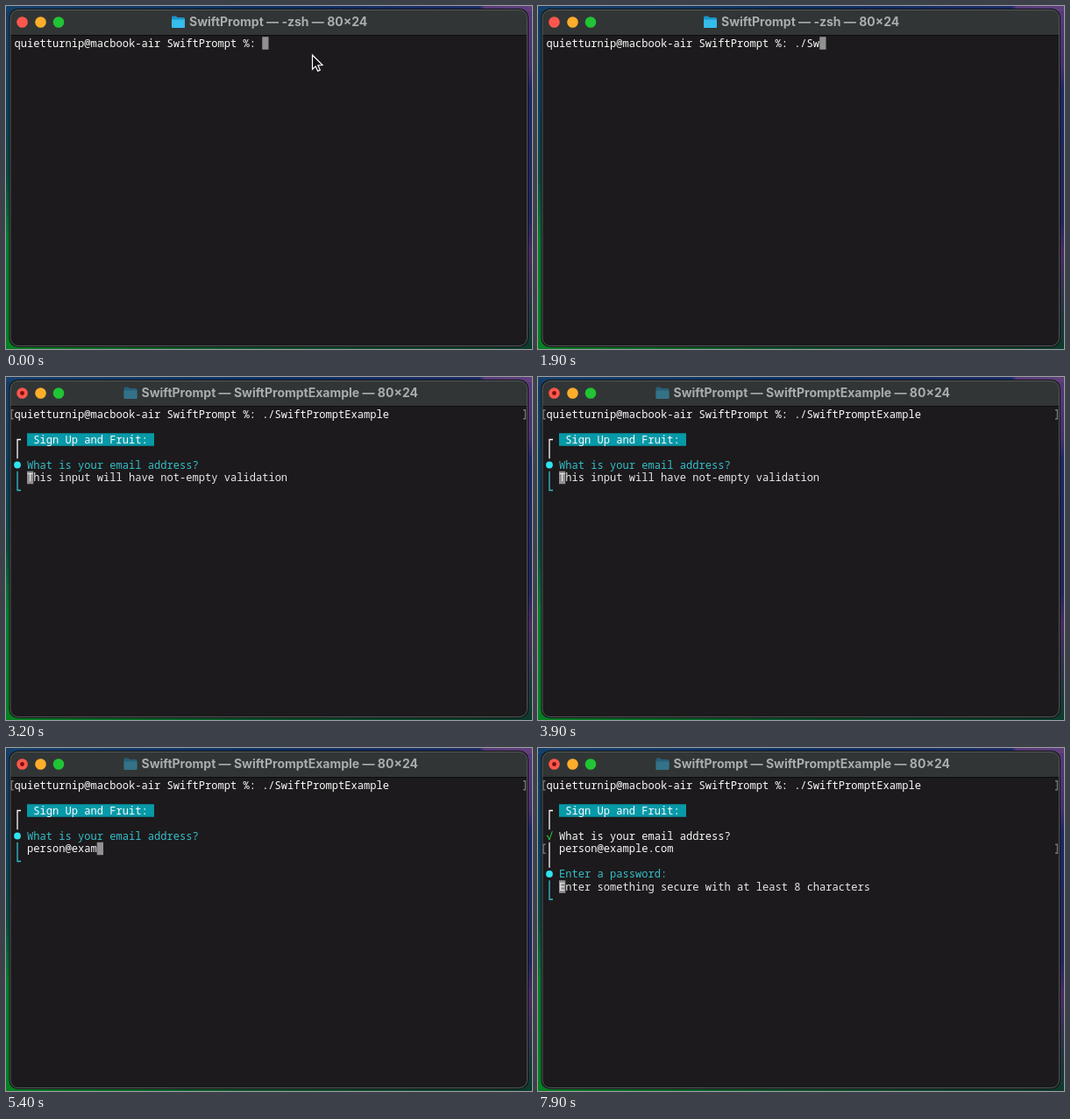
Animation, 600 px wide and 392 px high, one loop 8000 ms. Source, as an HTML page:

```html
<!DOCTYPE html>
<html lang="en">
<head>
<meta charset="utf-8">
<title>Terminal prompt</title>
<style>
  html, body { margin: 0; height: 100%; overflow: hidden; background: #10131c; }
  svg { display: block; width: 600px; height: 392px; }
  text { white-space: pre; }
  #title { font: 700 14px Inter, sans-serif; fill: #a9adad; }
  #screen text { font: 500 12.083px "Noto Sans Mono", monospace; }
</style>
</head>
<body>
<svg viewBox="0 0 600 392">
  <defs>
    <linearGradient id="left" x2="0" y2="1">
      <stop offset="0" stop-color="#173a63"/>
      <stop offset=".3" stop-color="#06405f"/>
      <stop offset=".5" stop-color="#064a42"/>
      <stop offset=".68" stop-color="#077a30"/>
      <stop offset="1" stop-color="#067f22"/>
    </linearGradient>
    <linearGradient id="right" x2="0" y2="1">
      <stop offset="0" stop-color="#583a78"/>
      <stop offset=".18" stop-color="#44306f"/>
      <stop offset=".24" stop-color="#1d2763"/>
      <stop offset=".62" stop-color="#20255a"/>
      <stop offset=".72" stop-color="#472c62"/>
      <stop offset="1" stop-color="#0c3a2c"/>
    </linearGradient>
    <linearGradient id="top">
      <stop offset="0" stop-color="#15406a"/>
      <stop offset=".5" stop-color="#0c2f62"/>
      <stop offset=".9" stop-color="#1b2a66"/>
      <stop offset=".91" stop-color="#573a78"/>
      <stop offset="1" stop-color="#603f7c"/>
    </linearGradient>
    <linearGradient id="bottom">
      <stop offset="0" stop-color="#067f22"/>
      <stop offset=".5" stop-color="#07502a"/>
      <stop offset="1" stop-color="#0c3a2c"/>
    </linearGradient>
  </defs>
  <rect width="300" height="392" fill="url(#left)"/>
  <rect x="300" width="300" height="392" fill="url(#right)"/>
  <rect width="600" height="6" fill="url(#top)"/>
  <rect y="386" width="600" height="6" fill="url(#bottom)"/>
  <rect x="3.5" y="3" width="592.5" height="387" rx="10" fill="#101313"/>
  <rect x="5" y="4.5" width="589.5" height="384" rx="9" fill="#1c1a1c"/>
  <path d="M5 33.5V13.5a9 9 0 0 1 9-9H585.5a9 9 0 0 1 9 9V33.5z" fill="#323535"/>
  <path d="M5 33.5H594.5" stroke="#0c0c0d"/>
  <rect x="5" y="4.5" width="589.5" height="384" rx="9" fill="none" stroke="#5d6161" stroke-width=".9"/>
  <circle cx="18.5" cy="18.5" r="6.3" fill="#ff574d"/>
  <circle id="busy" cx="18.5" cy="18.5" r="2.4" fill="#7a0f0a"/>
  <circle cx="39.5" cy="18.5" r="6.3" fill="#ffae2b"/>
  <circle cx="60" cy="18.5" r="6.3" fill="#20c434"/>
  <g id="folder">
    <path d="M0 1.5Q0 0 1.5 0H5L6.5 1.5H13.5Q15 1.5 15 3V12Q15 13.5 13.5 13.5H1.5Q0 13.5 0 12z" fill="#1b93c9"/>
    <path d="M0 4H15V12Q15 13.5 13.5 13.5H1.5Q0 13.5 0 12z" fill="#35bdec"/>
  </g>
  <text id="title" y="23"></text>
  <g id="screen"></g>
  <path id="pointer" d="M349.5 56V72.3L353.2 68.9L355.7 74.4L358.3 73.3L355.9 67.9L361 67.6z" fill="#111" stroke="#fff" stroke-width="1.2"/>
</svg>
<script>
const LOOP = 8000, CW = 7.25, LH = 14.5, LEFT = 9.5, TOP = 35.25;
const WHITE = "#fbfbfb", CYAN = "#35bfc9", BRIGHT = "#2fe3ee", GREY = "#929192";
const PROMPT = "quietturnip@macbook-air SwiftPrompt %: ";
const COMMAND = "./SwiftPromptExample", EMAIL = "person@example.com";
const KEYS = [800, 1100, 1500, 1800];   // "./Sw", then Tab completes the rest
const TAB = 2300, ENTER = 2800, FORM = 3000, TYPE = 4000, NEXT = 7500;

const $ = id => document.getElementById(id);
const colX = c => LEFT + c * CW;
const rowY = r => TOP + r * LH;

const put = (c, r, s, fill = WHITE, extra = "") =>
  `<text x="${colX(c)}" y="${rowY(r) + 11.4}" fill="${fill}" ${extra}>${s}</text>`;
const block = (c, r, n, fill) =>
  `<rect x="${colX(c)}" y="${rowY(r)}" width="${n * CW}" height="${LH}" fill="${fill}"/>`;
const cursor = (c, r) => block(c, r, 1, GREY);
const path = (d, color) => `<path d="${d}" fill="none" stroke="${color}" stroke-width="1.3"/>`;
const brackets = r =>
  path(`M8.6 ${rowY(r) + 2.5}h-2.4v10h2.4M590 ${rowY(r) + 2.5}h2.4v10h-2.4`, "#777");

// A question that is being answered: dot, label and the closing rail.
const question = (r, label) =>
  `<circle cx="13" cy="${rowY(r) + 7.25}" r="3.9" fill="${BRIGHT}"/>` +
  put(2, r, label, CYAN) +
  path(`M13 ${rowY(r + 1)}V${rowY(r + 2) + 7.25}H17`, CYAN);
const hint = (r, s) => cursor(2, r) + put(2, r, s, "#e9e9e9");

function form(t) {
  let s = path(`M17 ${rowY(2) + 7.25}H13V${rowY(4)}`, WHITE) +
    block(2, 2, 20, "#0699a8") + put(3, 2, "Sign Up and Fruit:", WHITE, 'font-weight="700"');
  if (t < NEXT) {
    const n = Math.max(0, Math.min(EMAIL.length, Math.floor((t - TYPE) / 125)));
    s += question(4, "What is your email address?");
    return s + (n ? put(2, 5, EMAIL.slice(0, n)) + cursor(2 + n, 5)
                  : hint(5, "This input will have not-empty validation"));
  }
  return s + put(0, 4, "√", "#35d83b") + put(2, 4, "What is your email address?") +
    put(2, 5, EMAIL) + brackets(5) + path(`M13 ${rowY(5)}V${rowY(7)}`, WHITE) +
    question(7, "Enter a password:") +
    hint(8, "Enter something secure with at least 8 characters");
}

function screen(t) {
  const n = t < TAB ? KEYS.filter(k => t >= k).length : COMMAND.length;
  const line = PROMPT + COMMAND.slice(0, n);
  let s = put(0, 0, line);
  if (t < ENTER) return s + cursor(line.length, 0);
  s += brackets(0);
  return s + (t < FORM ? cursor(0, 1) : form(t));
}

let last = "";
function draw(now) {
  const t = now % LOOP, busy = t >= FORM, html = screen(t);
  if (html !== last) $("screen").innerHTML = last = html;
  $("title").textContent = `SwiftPrompt — ${busy ? "SwiftPromptExample" : "-zsh"} — 80×24`;
  $("title").setAttribute("x", busy ? 154.5 : 209);
  $("folder").setAttribute("transform", `translate(${busy ? 134.5 : 189} 11.5)`);
  $("folder").setAttribute("opacity", busy ? .45 : 1);
  $("busy").setAttribute("visibility", busy ? "visible" : "hidden");
  $("pointer").setAttribute("visibility", t < KEYS[0] ? "visible" : "hidden");
  requestAnimationFrame(draw);
}
draw(0);
</script>
</body>
</html>
```
